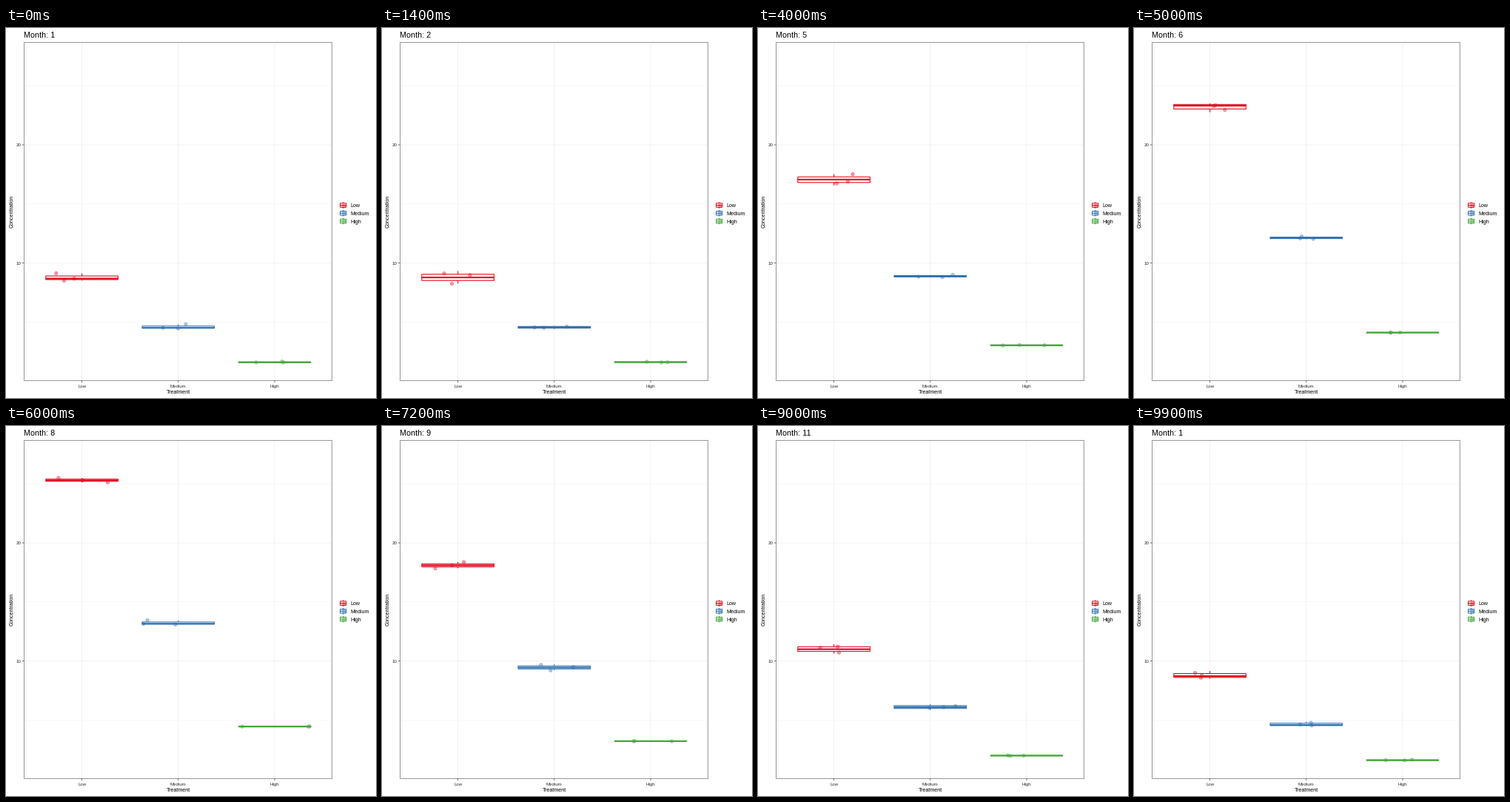
Recreate the animation shown at these times as a matplotlib script. Size 500 by 500 pixels, loop 10 s.

```python
import matplotlib.pyplot as plt
import numpy as np
from matplotlib.animation import FuncAnimation
from matplotlib.patches import Rectangle

plt.rcParams["font.family"] = "Liberation Sans"
plt.rcParams["path.snap"] = False

SIZE, DPI = 500, 100
PX = 72 / DPI
NAMES = ["Low", "Medium", "High"]
COLORS = ["#e0081d", "#3071b0", "#42a538"]
PITCH = 130.2
CENTERS = 102.6 + PITCH * np.arange(3)
HALF = 0.375 * PITCH
INK, TEXT, GRID = "#333333", "#2b2b2b", "#efefef"
LEFT, TOP, RIGHT, BOTTOM = 24.5, 19.5, 440.6, 476.5


def y_of(value):
    return 477.2 - 15.96 * value


# --- samples: monthly medians of the low dose drive everything else ---
LOW = np.array([8.68, 7.95, 9.61, 11.07, 16, 19.2, 26.07, 25.3, 18.3, 17.3, 14.15, 8.9])
SPREAD = np.array([0.6, 0.28, 0.06])
MONTH = np.arange(1, 13)

late = np.exp(-(MONTH - 11.3) ** 2)  # the medium dose fades more slowly in late autumn
medians = np.stack([LOW, (0.52 + 0.045 * late) * LOW, 0.172 * LOW + 0.1], axis=1)

rng = np.random.default_rng(11)
shape = (12, 3, 3)  # month, treatment, replicate
offsets = rng.uniform(0.15, 1.15, shape) * np.array([-1, 0, 1])
values = medians[..., None] + SPREAD[:, None] * rng.permuted(offsets, axis=2)
jitter = 0.37 * PITCH * rng.uniform(-1, 1, shape)
DOTS = np.stack([CENTERS[:, None] + jitter, y_of(values)], axis=-1)
STATS = np.quantile(DOTS[..., 1], [0, 0.25, 0.5, 0.75, 1], axis=2)

# --- timing: three still frames, then a tween; spring tweens are a step longer ---
HOLD = 3
TWEENS = np.where(MONTH <= 5, 6, 5)
ENDS = np.cumsum(TWEENS + HOLD) - np.maximum(MONTH - 5, 0) * 0
ENDS = ENDS - 1


def locate(frame):
    """Return the current month index and the steps taken toward the next."""
    month = int(np.searchsorted(ENDS, frame, side="right"))
    return month, max(0, frame - ENDS[month] + TWEENS[month])


# --- static parts ---
fig = plt.figure(figsize=(SIZE / DPI, SIZE / DPI), dpi=DPI, facecolor="white")
ax = fig.add_axes([0, 0, 1, 1])
ax.set_xlim(0, SIZE)
ax.set_ylim(SIZE, 0)
ax.axis("off")


def line(x, y, color, width, z):
    return ax.plot(x, y, color=color, lw=width * PX, zorder=z,
                   solid_capstyle="butt", snap=False)[0]


def label(x, y, text, size, color="black", **kw):
    return ax.text(x, y, text, size=size * PX, color=color, **kw)


def outline(x, y, w, h, color, width, fill, z):
    return ax.add_patch(Rectangle((x, y), w, h, ec=color, fc=fill, lw=width * PX,
                                  zorder=z, joinstyle="miter", snap=False))


def scatter(xy, colors):
    x, y = np.transpose(xy)
    return ax.scatter(x, y, s=(4.6 * PX) ** 2, c=colors, edgecolors=colors,
                      linewidths=0.7 * PX, alpha=0.4, zorder=6, snap=False)


for v in range(5, 30, 5):
    major = v % 10 == 0
    line([LEFT, RIGHT], [y_of(v)] * 2, GRID, 0.8 if major else 0.4, 1)
    if major:
        line([LEFT - 2.5, LEFT], [y_of(v)] * 2, INK, 0.7, 1)
        label(20.6, y_of(v) + 2.2, str(v), 6.2, TEXT, ha="right")
for cx, name in zip(CENTERS, NAMES):
    line([cx, cx], [TOP, BOTTOM], GRID, 0.8, 1)
    line([cx, cx], [BOTTOM, BOTTOM + 2.5], INK, 0.7, 1)
    label(cx, 485.6, name, 6.2, TEXT, ha="center")
outline(LEFT, TOP, RIGHT - LEFT, BOTTOM - TOP, INK, 0.5, "none", 7)
label(CENTERS[1], 494, "Treatment", 7.2, ha="center")
label(11.5, 247.6, "Concentration", 7.2, ha="right", va="center", rotation=90)

for i, (name, color) in enumerate(zip(NAMES, COLORS)):
    kx, ky = 455.7, 239.5 + 10.75 * i
    line([kx, kx], [ky - 4.3, ky + 4.3], color, 1.07, 3)
    outline(kx - 4.05, ky - 2.7, 8.1, 5.4, color, 1.07, "white", 4)
    line([kx - 4.05, kx + 4.05], [ky, ky], color, 1.07, 5)
    scatter([(kx, ky)], [color])
    label(465, ky + 2.6, name, 7.2)

# --- moving parts ---
title = label(LEFT, 13.3, "", 10.8)
boxes = [(line([cx, cx], [0, 0], color, 1.07, 3),
          outline(cx - HALF, 0, 2 * HALF, 1, color, 1.07, "white", 4),
          line([cx - HALF, cx + HALF], [0, 0], color, 2.2, 5))
         for cx, color in zip(CENTERS, COLORS)]
points = scatter(DOTS[0].reshape(9, 2), np.repeat(COLORS, 3))


def update(frame):
    month, step = locate(frame)
    after = (month + 1) % 12
    t = step / TWEENS[month]
    title.set_text(f"Month: {(after if step > 3 else month) + 1}")
    points.set_offsets(((1 - t) * DOTS[month] + t * DOTS[after]).reshape(9, 2))
    stats = (1 - t) * STATS[:, month] + t * STATS[:, after]
    for (whisker, box, middle), (top, q3, med, q1, low) in zip(boxes, stats.T):
        whisker.set_ydata([top, low])
        box.set_y(q3)
        box.set_height(q1 - q3)
        middle.set_ydata([med, med])
    return [title, points]


anim = FuncAnimation(fig, update, frames=100, interval=100, repeat=True, repeat_delay=0)
plt.show()
```
